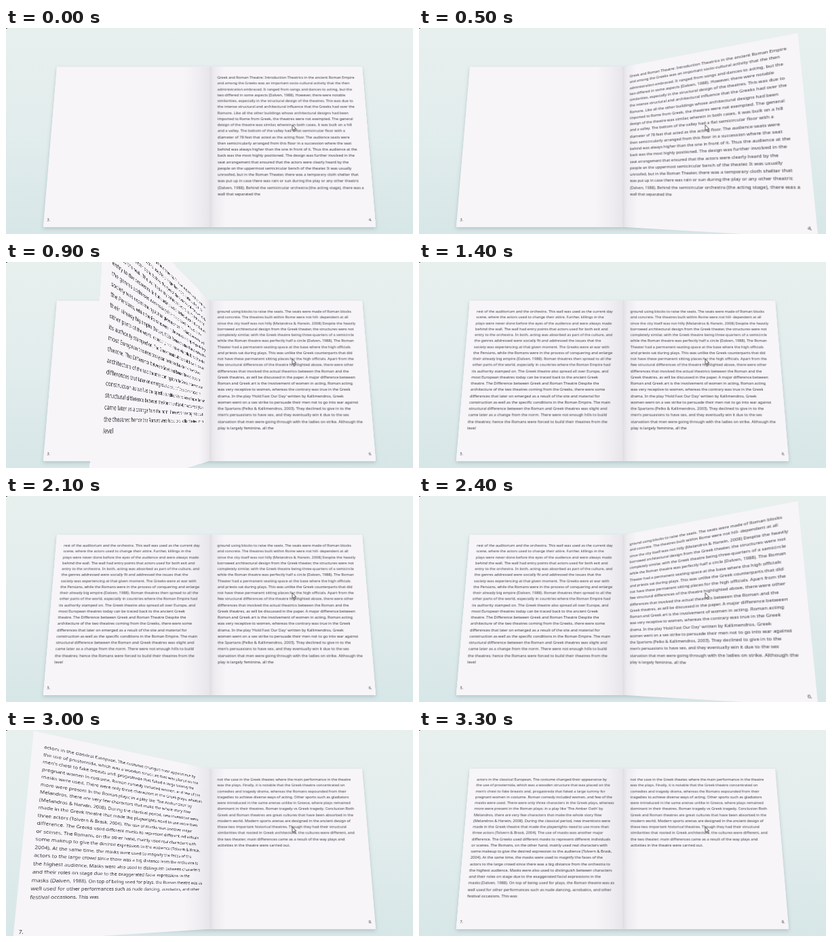
Recreate the animation shown at these times as an HTML page. Size 600x304 px, loop 3500 ms.

```html
<!DOCTYPE html>
<html lang="en">
<head>
<meta charset="utf-8">
<title>Turning book pages</title>
<style>
html, body { margin: 0; width: 100%; height: 100%; overflow: hidden; }
#stage {
  position: relative; width: 600px; height: 304px; overflow: hidden;
  background: linear-gradient(#e8f0ee, #e1ecec 55%, #d7e6e7);
  perspective: 447px; perspective-origin: 300px 167px;
}
.sheet {
  position: absolute; top: 50.6px; height: 238.8px; width: 235px;
  background-color: #f7f5f8;
}
.board {
  left: 65px; width: 470px; transform-origin: 50% 124.4px;
  transform: rotateX(9.2deg);
  box-shadow: 0 2px 5px rgba(80, 110, 120, .3);
}
.left {
  left: 65px; transform-origin: 100% 124.4px;
  background-image: linear-gradient(to left, rgba(60, 50, 70, .08), rgba(60, 50, 70, .035) 8%, transparent 17%);
}
.right {
  left: 300px; transform-origin: 0 124.4px;
  background-image: linear-gradient(to right, rgba(60, 50, 70, .12), rgba(60, 50, 70, .05) 3%, transparent 10%);
}
/* Type is set at four times its size so that letter spacing stays exact. */
.type {
  position: absolute; left: 0; top: 0; width: 940px; height: 955px;
  transform: scale(.25); transform-origin: 0 0;
  font: 22.6px/37px "Noto Sans", "Open Sans", sans-serif; color: #36343a;
}
.body { position: absolute; left: 48px; top: 49px; white-space: pre; }
.folio { position: absolute; bottom: 19px; font-size: 21px; }
.left .folio { left: 18px; }
.right .folio { right: 18px; }
#pointer { position: absolute; left: 421px; top: 142px; z-index: 20; }
#corner { position: absolute; left: 0; top: 0; width: 2px; height: 1px; background: #555; z-index: 20; }
</style>
</head>
<body>
<div id="stage">
  <div class="sheet board"></div>
  <svg id="pointer" width="9" height="13" viewBox="0 0 9 13">
    <path d="M1 1V9.2L2.9 7.5L4.3 10.6L5.6 10L4.2 7H6.8Z" fill="#fff" stroke="#444" stroke-width=".8"/>
  </svg>
  <div id="corner"></div>
</div>
<script>
const LOOP = 3500, STEP = 100, TURN = 1215, STARTS = [200, 2100];
const TILT = 9.2, FIRST_FOLIO = 3;

const texts = [
'',
`Greek and Roman Theatre: Introduction Theatrics in the ancient Roman Empire
and among the Greeks was an important socio-cultural activity that the then
administration embraced. It ranged from songs and dances to acting, but the
two differed in some aspects (Dalven, 1988). However, there were notable
similarities, especially in the structural design of the theatres. This was due to
the intense structural and architectural influence that the Greeks had over the
Romans. Like all the other buildings whose architectural designs had been
imported to Rome from Greek, the theatres were not exempted. The general
design of the theatre was similar, wherein in both cases, it was built on a hill
and a valley. The bottom of the valley had a flat semicircular floor with a
diameter of 78 feet that acted as the acting floor. The audience seats were
then semicircularly arranged from this floor in a succession where the seat
behind was always higher than the one in front of it. Thus the audience at the
back was the most highly positioned. The design was further involved in the
seat arrangement that ensured that the actors were clearly heard by the
people on the uppermost semicircular bench of the theater. It was usually
unroofed, but in the Roman Theater, there was a temporary cloth shelter that
was put up in case there was rain or sun during the play or any other theatric
(Dalven, 1988). Behind the semicircular orchestra (the acting stage), there was a
wall that separated the`,
`rest of the auditorium and the orchestra. This wall was used as the current day
scene, where the actors used to change their attire. Further, killings in the
plays were never done before the eyes of the audience and were always made
behind the wall. The wall had entry points that actors used for both exit and
entry to the orchestra. In both, acting was absorbed as part of the culture, and
the genres addressed were socially fit and addressed the issues that the
society was experiencing at that given moment. The Greeks were at war with
the Persians, while the Romans were in the process of conquering and enlarge
their already big empire (Dalven, 1988). Roman theatres then spread to all the
other parts of the world, especially in countries where the Roman Empire had
its authority stamped on. The Greek theatre also spread all over Europe, and
most European theatres today can be traced back to the ancient Greek
theatre. The Difference between Greek and Roman Theatre Despite the
architecture of the two theatres coming from the Greeks, there were some
differences that later on emerged as a result of the site and material for
construction as well as the specific conditions in the Roman Empire. The main
structural difference between the Roman and Greek theatres was slight and
came later as a change from the norm. There were not enough hills to build
the theatres; hence the Romans were forced to build their theatres from the
level`,
`ground using blocks to raise the seats. The seats were made of Roman blocks
and concrete. The theatres built within Rome were not hill- dependent at all
since the city itself was not hilly (Melandros & Harwin, 2008) Despite the heavily
borrowed architectural design from the Greek theater, the structures were not
completely similar, with the Greek theatre being three-quarters of a semicircle
while the Roman theatre was perfectly half a circle (Dalven, 1988). The Roman
Theater had a permanent seating space at the base where the high officials
and priests sat during plays. This was unlike the Greek counterparts that did
not have these permanent sitting places for the high officials. Apart from the
few structural differences of the theatre highlighted above, there were other
differences that involved the actual theatrics between the Roman and the
Greek theatres, as will be discussed in the paper. A major difference between
Roman and Greek art is the involvement of women in acting. Roman acting
was very receptive to women, whereas the contrary was true in the Greek
drama. In the play 'Hold Fast Our Day' written by Kallimendros, Greek
women went on a sex strike to persuade their men not to go into war against
the Spartans (Pelko & Kallimendros, 2003). They declined to give in to the
men's persuasions to have sex, and they eventually win it due to the sex
starvation that men were going through with the ladies on strike. Although the
play is largely feminine, all the`,
`actors in the classical European. The costume changed their appearance by
the use of prosternida, which was a wooden structure that was placed on the
men's chest to fake breasts and, progastreda that faked a large tummy for
pregnant women in costume. Roman comedy included women, and few of the
masks were used. There were only three characters in the Greek plays, whereas
more were present in the Roman plays; in a play like 'The Amber Oath' by
Melandros, there are very few characters that make the whole story flow
(Melandros & Harwin, 2008). During the classical period, new inventions were
made in the Greek theatre that made the playwrights need to use more than
three actors (Tolvern & Brask, 2004). The use of masks was another major
difference. The Greeks used different masks to represent different individuals
or scenes. The Romans, on the other hand, mainly used real characters with
some makeup to give the desired expression to the audience (Tolvern & Brask,
2004). At the same time, the masks were used to magnify the faces of the
actors to the large crowd since there was a big distance from the orchestra to
the highest audience. Masks were also used to distinguish between characters
and their roles on stage due to the exaggerated facial expressions in the
masks (Dalven, 1988). On top of being used for plays, the Roman theatre was as
well used for other performances such as nude dancing, acrobatics, and other
festival occasions. This was`,
`not the case in the Greek theater, where the main performance in the theatre
was the plays. Finally, it is notable that the Greek theatre concentrated on
comedies and tragedy drama, whereas the Romans expounded from their
tragedies to achieve diverse ways of acting. Other sports such as gladiators
were introduced in the same arenas unlike in Greece, where plays remained
dominant in their theatres. Roman tragedy vs Greek tragedy. Conclusion Both
Greek and Roman theatres are great cultures that have been absorbed in the
modern world. Modern sports arenas are designed in the ancient design of
these two important historical theatres. Though they had their structural
similarities that rooted in Greek architecture, the cultures were different, and
the two theater; main differences came as a result of the way plays and
activities in the theatre were carried out.`
];

const stage = document.getElementById('stage');

function addTo(parent, className, text = '') {
  const el = document.createElement('div');
  el.className = className;
  el.textContent = text;
  parent.append(el);
  return el;
}

const pages = texts.map((text, i) => {
  const isLeft = i % 2 === 0;
  const el = addTo(stage, 'sheet ' + (isLeft ? 'left' : 'right'));
  const type = addTo(el, 'type');
  addTo(type, 'body', text);
  addTo(type, 'folio', FIRST_FOLIO + i + '.');
  el.style.zIndex = isLeft ? i + 1 : texts.length - i;
  // A leaf has a right page as its front and the next left page as its back.
  return { el, isLeft, leaf: isLeft ? i / 2 - 1 : (i - 1) / 2 };
});

function leafAngle(leaf, time) {
  if (leaf < 0) return 180;
  if (leaf >= STARTS.length) return 0;
  const p = Math.min(1, Math.max(0, (time - STARTS[leaf]) / TURN));
  return 90 * (1 - Math.cos(Math.PI * p));
}

function draw(now) {
  const time = Math.floor((now % LOOP) / STEP) * STEP;
  for (const { el, isLeft, leaf } of pages) {
    const angle = leafAngle(leaf, time);
    const shown = isLeft ? angle > 90 : angle < 90;
    const turn = isLeft ? 180 - angle : -angle;
    el.style.visibility = shown ? 'visible' : 'hidden';
    el.style.transform = `rotateX(${TILT}deg) rotateY(${turn}deg)`;
  }
}

function tick() {
  draw(performance.now());
  requestAnimationFrame(tick);
}
tick();
</script>
</body>
</html>
```
